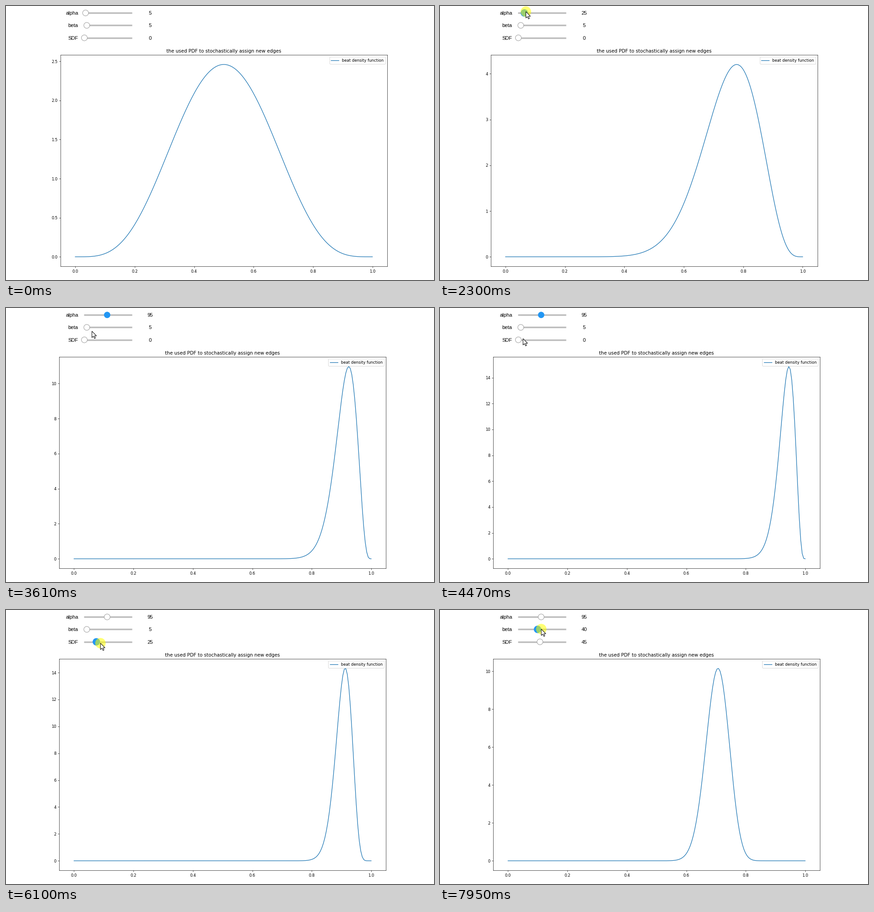
A matplotlib script for the animation above (8000 ms loop, 934 by 600 pixels).

```python
import math

import matplotlib.pyplot as plt
import numpy as np
from matplotlib.animation import FuncAnimation
from matplotlib.patches import Circle, Polygon

W, H, DPI = 934, 600, 64
INTERVAL, LOOP = 40, 8000
PT = 72 / DPI                      # points per pixel
ZOOM = 0.96                        # size of the chart against default style

plt.rcParams.update({"font.family": "DejaVu Sans", "font.size": 10 * ZOOM,
                     "axes.linewidth": 0.8 * ZOOM, "lines.linewidth": 1.5 * ZOOM,
                     "axes.titlepad": 5.4 * ZOOM})

# Mouse strokes: start and end time, then where the pointer arrives.
ENTRY = (733, 494)
STROKES = [
    (290, 440, (517, 272)),
    (590, 1440, (185, 17)),
    (1500, 1830, (177, 11.5)),
    (2060, 2900, (223.5, 11.5)),
    (2990, 3610, (187, 50)),
    (3650, 4930, (178, 73)),
    (5640, 6494, (226, 71)),
    (6750, 7110, (184, 41)),
    (7340, 7950, (220.5, 41)),
]
ALPHA_DRAG, SDF_DRAG, BETA_DRAG = (1980, 2990), (5160, 6700), (7340, LOOP)

BLUE, GREY = "#2196f3", "#bdbdbd"
X = np.linspace(0, 1, 200)
ARROW = np.array([(0, 0), (0, 14), (3.3, 11), (5.6, 16),
                  (7.8, 15), (5.6, 10.2), (10, 10.2)])


def within(t, span):
    return span[0] <= t < span[1]


def mouse(t):
    pos = np.array(ENTRY, float)
    for start, end, target in STROKES:
        u = np.clip((t - start) / (end - start), 0, 1)
        pos += (target - pos) * u * u * (3 - 2 * u)
    return pos


def refreshed(t, first, period, limit):
    """Value the lagging chart has reached: it gains 5 with every redraw."""
    redraws = math.floor((t - first) / period) + 1
    return 5 * min(max(redraws, 0), limit)


def beta_pdf(a, b):
    scale = math.exp(math.lgamma(a + b) - math.lgamma(a) - math.lgamma(b))
    return scale * X ** (a - 1) * (1 - X) ** (b - 1)


fig = plt.figure(figsize=(W / DPI, H / DPI), dpi=DPI, facecolor="white")
chart = fig.add_axes([0.12, 0.05, 0.76, 0.77])
chart.set_title("the used PDF to stochastically assign new edges")
chart.tick_params(length=3.5 * ZOOM, width=0.8 * ZOOM, pad=3.5 * ZOOM)
chart.tick_params(axis="x", pad=4.3 * ZOOM)
curve, = chart.plot(X, beta_pdf(5, 5), color="#1f77b4", label="beat density function")
chart.set_xlim(-0.05, 1.05)
chart.legend(loc="upper right")

stage = fig.add_axes([0, 0, 1, 1], zorder=5)
stage.set(xlim=(0, W), ylim=(H, 0))
stage.axis("off")


class Slider:
    ZERO, LENGTH = 171, 104.7

    def __init__(self, name, row, top, grip, drag, blur):
        self.y = 15.2 + 27.25 * row
        self.per_unit = self.LENGTH / top
        self.grip, self.drag = grip, drag
        self.focus = drag[0] + 60, blur
        style = dict(family="Liberation Sans", size=11.1 * PT, color="black")
        stage.text(157.6, self.y + 3.9, name, ha="right", **style)
        self.readout = stage.text(314.4, self.y + 3.9, "", ha="center", **style)
        stage.plot([169.5, 275.3], [self.y, self.y], color=GREY, lw=3.4 * PT,
                   solid_capstyle="butt")
        self.knob = stage.add_patch(Circle((0, 0), lw=PT, zorder=3))

    def update(self, t):
        x = mouse(np.clip(t, *self.drag))[0]
        value = 5 * int((x - self.grip - self.ZERO) / self.per_unit // 5)
        focused = within(t, self.focus)
        self.readout.set_text(str(value))
        self.knob.center = self.ZERO + value * self.per_unit, self.y
        self.knob.set_radius(7.6 if focused and within(t, self.drag) else 6.4)
        self.knob.set_facecolor(BLUE if focused else "white")
        self.knob.set_edgecolor(BLUE if focused else "#9e9e9e")


sliders = [
    Slider("alpha", 0, 200, 2, ALPHA_DRAG, blur=SDF_DRAG[0]),
    Slider("beta", 1, 100, 7.5, BETA_DRAG, blur=LOOP),
    Slider("SDF", 2, 100, 6, SDF_DRAG, blur=BETA_DRAG[0]),
]
glow = stage.add_patch(Circle((0, 0), 11.4, fc="#ffff00", ec="none", alpha=0.55, zorder=4))
pointer = stage.add_patch(Polygon(ARROW, fc="white", ec="black", lw=PT,
                                  joinstyle="miter", zorder=5))


def place_chart():
    """Shift the chart right by the width of its widest y label."""
    low, high = chart.get_ylim()
    ticks = [v for v in chart.get_yticks() if low <= v <= high]
    labels = chart.yaxis.get_major_formatter().format_ticks(ticks)
    width = max(0.636 * len(s) - 0.318 * s.count(".") for s in labels) * 8.53
    chart.set_position([(105.1 + width) / W, 1 - 570.3 / H, 713.4 / W, 463.3 / H])


def draw(frame):
    t = frame * INTERVAL + 30

    a = 5 + refreshed(t, first=2050, period=197, limit=18)
    b = 5 + refreshed(t, first=6020, period=310, limit=9)
    y = beta_pdf(a, b)
    curve.set_ydata(y)
    chart.set_ylim(-0.05 * y.max(), 1.05 * y.max())
    place_chart()

    for slider in sliders:
        slider.update(t)
    tip = mouse(t) + (0.5, 0.8)
    pointer.set_xy(ARROW + tip)
    pointer.set_visible(t >= STROKES[0][0])
    glow.center = tip
    glow.set_visible(any(within(t, slider.drag) for slider in sliders))
    return []


anim = FuncAnimation(fig, draw, frames=LOOP // INTERVAL, interval=INTERVAL,
                     repeat=True, repeat_delay=0, blit=False)
plt.show()
```
